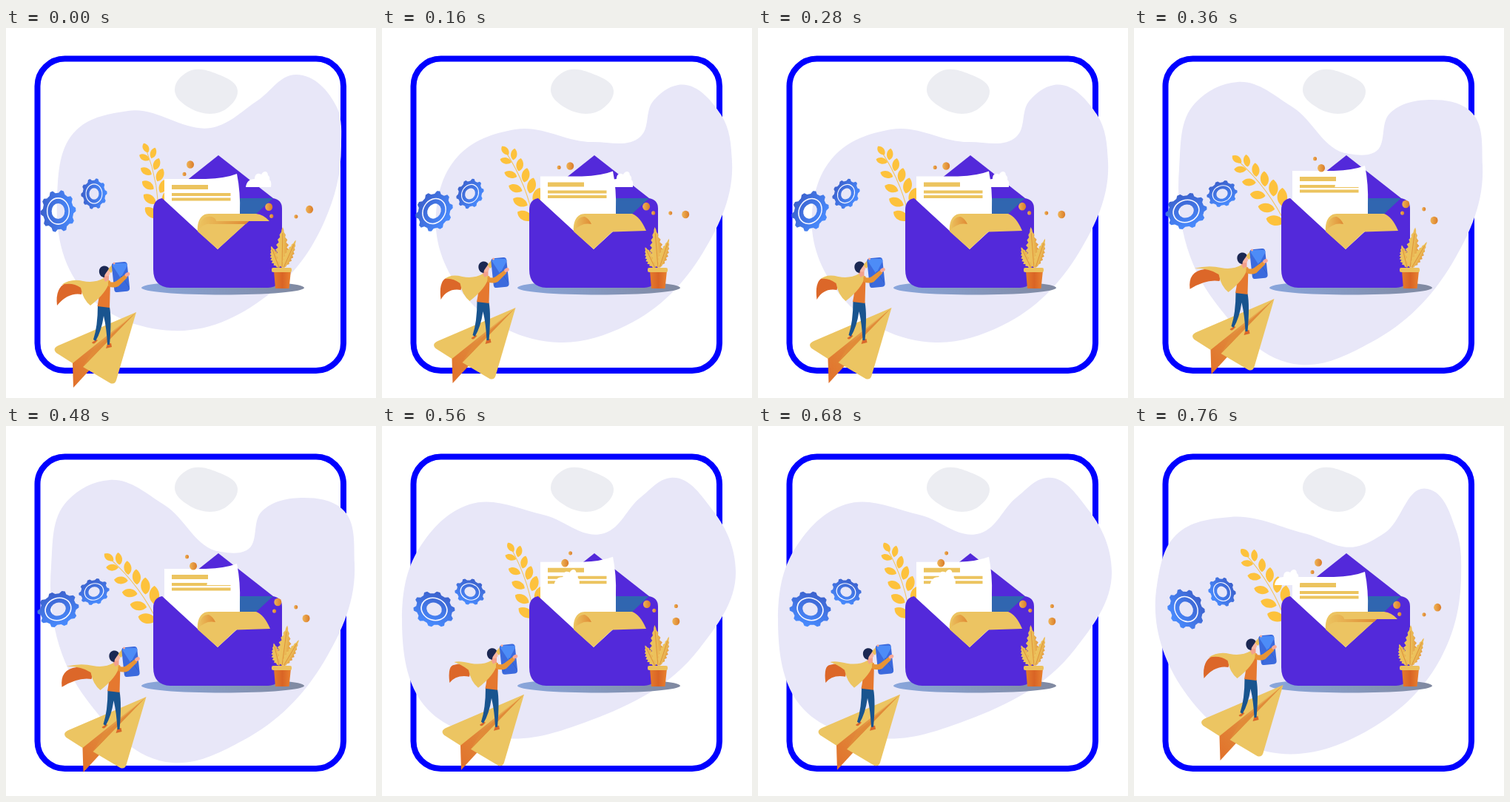
An HTML page for the animation above (800 ms loop, 500 px wide and 500 px high).

```html
<!DOCTYPE html>
<html lang="en">
<head>
<meta charset="utf-8">
<title>Mail delivery</title>
<style>
  html, body { margin: 0; width: 100%; height: 100%; overflow: hidden; background: #fff; }
  svg { display: block; width: 100vw; height: 100vh; }
</style>
</head>
<body>
<svg viewBox="0 0 500 500">
  <defs>
    <linearGradient id="shade"><stop stop-color="#89a6dc"/><stop offset="1" stop-color="#8089a0"/></linearGradient>
    <linearGradient id="steel" x2="0" y2="1"><stop stop-color="#498cff"/><stop offset="1" stop-color="#3c61cc"/></linearGradient>
    <linearGradient id="coin"><stop stop-color="#efb456"/><stop offset="1" stop-color="#da7c2a"/></linearGradient>
    <linearGradient id="clay"><stop stop-color="#e57b2d"/><stop offset=".5" stop-color="#d96425"/><stop offset="1" stop-color="#e9812f"/></linearGradient>
    <linearGradient id="leaf"><stop stop-color="#edc660"/><stop offset=".55" stop-color="#ebbd58"/><stop offset="1" stop-color="#e3963b"/></linearGradient>
    <linearGradient id="fold" x1="1" x2="0" y2="1"><stop stop-color="#ecc360"/><stop offset=".6" stop-color="#e0883a"/><stop offset="1" stop-color="#e2702a"/></linearGradient>
    <linearGradient id="curl"><stop stop-color="#ecc460"/><stop offset="1" stop-color="#df8a34"/></linearGradient>
  </defs>

  <rect x="42.500" y="41.500" width="413.500" height="421.500" rx="37" fill="none" stroke="#00f" stroke-width="8"/>
  <path id="blob" fill="#e8e7f8"/>
  <path id="patch" fill="#ecedf2"/>
  <ellipse cx="293" cy="351" rx="110" ry="9.500" fill="url(#shade)"/>
  <g id="spray" fill="#fdc23c"></g>

  <path d="M287 172L361 230V260H214V230Z" fill="#5329da"/>
  <path d="M316 230H361L336 254H316Z" fill="#3066b0"/>
  <path id="paper" fill="#fff"/>
  <path id="lines" fill="#ecc45f" d="M224 212h49v6h-49zM224 223h79.500v4h-79.500zM224 229.500h79.500v4h-79.500z"/>
  <path d="M199 246Q199 232 211 230L286 299L361 230Q373 232 373 244V331Q372 350 354 351H222Q199 350 199 326Z" fill="#5329da"/>
  <path id="scroll" fill="#ecc462"/>
  <path id="crease" fill="url(#curl)"/>
  <g id="dots" fill="url(#coin)"></g>
  <path id="cloud" fill="#fff" d="M0 0C1-8 6-11 12-11C12-18 17-20 21-17C24-23 30-22 30-16C34-13 31-10 33-9Q35-7 34 0Z"/>

  <g id="plant" fill="url(#leaf)"></g>
  <path d="M362 328H385L382.500 352H364Z" fill="url(#clay)"/>
  <rect x="359" y="324" width="27" height="6" rx="2" fill="#ecc05c"/>
  <g id="gears"></g>

  <g id="flyer">
    <path d="M176 384L71 429Q62 433 68 439L90 453L106 458Z" fill="#ecc562"/>
    <path d="M176 384L90 453L91 486L114 461Z" fill="url(#fold)"/>
    <path d="M176 384L104 458L141 480Q147 482 149 476Z" fill="#ecc562"/>
    <path d="M176 384L117 436L104 458Z" fill="#e18b38"/>
    <path d="M137 327L146 317L150 320L142 331Z" fill="#ecc05a"/>
    <path d="M122 421L116 425Q118 428 121 425L124 422ZM137 427L135 433L143 431L142 426Z" fill="#d9692b"/>
    <path d="M124 375L140 377Q143 393 140 428H137Q136 406 132 389Q129 410 121 423L118 421Q124 403 124 375Z" fill="#19548f"/>
    <path d="M126 343Q135 337 141 342L140 378L123.500 376Q127 360 126 343Z" fill="#e5782f"/>
    <path id="lining" fill="#dc6729"/>
    <path id="cape" fill="#ecc562"/>
    <path d="M130 334H139V340L134 343Z" fill="#f3a08c"/>
    <circle cx="136" cy="331" r="4.500" fill="#f8b5a2"/>
    <path d="M139 325C137 320 128 320 126 327C125 333 129 337 133 337C133 332 136 331 139 325Z" fill="#1b2853"/>
    <rect x="-10.500" y="-20" width="21" height="40" rx="4" transform="translate(155 336.500) rotate(-6)" fill="#3b6add"/>
    <path d="M146 318H161Q164 318 164 321L155 338L144 321Z" fill="#4d8cf7"/>
    <path d="M148 354L156 335L166 350" fill="none" stroke="#345fca"/>
    <path d="M138 342Q144 345 149 342L161 333L164 337L152 349Q146 352 138 349Z" fill="#e89435"/>
    <ellipse cx="164" cy="333" rx="3.500" ry="2.500" transform="rotate(-30 164 333)" fill="#f8a998"/>
    <circle cx="146" cy="318" r="1.500" fill="#f8a998"/>
  </g>
</svg>
<script>
const NS = 'http://www.w3.org/2000/svg';
const LOOP = 800, CLIP = 760, HOLD = 200, FIRST = 160;
const $ = id => document.getElementById(id);
const set = (node, attrs) => { for (const k in attrs) node.setAttribute(k, attrs[k]); };
const rad = deg => deg * Math.PI / 180;

function add(parent, tag, attrs) {
  const node = document.createElementNS(NS, tag);
  set(node, attrs);
  return parent.appendChild(node);
}

// Closed smooth curve through "x,y x,y ..."; tangents follow the circle through three neighbours
function smooth(text) {
  const p = text.split(' ').map(s => s.split(',').map(Number));
  const n = p.length;
  const edge = p.map((a, i) => {
    const b = p[(i + 1) % n], x = b[0] - a[0], y = b[1] - a[1], len = Math.hypot(x, y);
    return { len, x: x / len, y: y / len };
  });
  const dir = p.map((_, i) => {
    const e = edge[(i + n - 1) % n], f = edge[i];
    const x = e.x * f.len + f.x * e.len, y = e.y * f.len + f.y * e.len, len = Math.hypot(x, y);
    return [x / len, y / len];
  });
  let d = 'M' + p[0];
  p.forEach((a, i) => {
    const j = (i + 1) % n, h = edge[i].len * .35;
    d += `C${a.map((v, k) => v + dir[i][k] * h)} ${p[j].map((v, k) => v - dir[j][k] * h)} ${p[j]}`;
  });
  return d + 'Z';
}

function gearPath(r, teeth) {
  const pts = [], hole = r * .37;
  for (let i = 0; i < teeth * 4; i++) {
    const side = i % 4, k = side === 1 || side === 2 ? 1 : .87;
    const a = rad((i + (side === 0 ? .2 : side === 3 ? -.2 : 0)) * 90 / teeth);
    pts.push([r * k * Math.cos(a), r * k * Math.sin(a)]);
  }
  return `M${pts.join('L')}ZM${-hole} 0a${hole} ${hole} 0 1 0 ${2 * hole} 0a${hole} ${hole} 0 1 0 ${-2 * hole} 0Z`;
}

function makeGear(x, y, r) {
  const node = add($('gears'), 'g', {});
  add(node, 'path', { d: gearPath(r, 10), fill: 'url(#steel)', 'fill-rule': 'evenodd' });
  add(node, 'circle', { r: r * .62, fill: 'none', stroke: '#f8f8ff', 'stroke-width': r * .06 });
  return { node, x, y };
}

// Jagged leaf growing upwards from its root
function frond(x, len, width, angle) {
  const n = 16, left = [], right = [];
  for (let i = 0; i <= n; i++) {
    const t = i / n;
    const w = width * Math.sin(Math.PI * Math.pow(t, .75)) * (i % 2 ? 1 : .65);
    left.push([-w, -len * t]);
    right.unshift([w, -len * t]);
  }
  const transform = `translate(${x} 324) rotate(${angle})`;
  add($('plant'), 'path', { d: `M${left.concat(right).join('L')}Z`, transform });
  add($('plant'), 'path', { d: `M0 0V${-len * .85}`, stroke: '#dd8a35', 'stroke-width': .8, transform });
}

function lens(x, y, len, w, angle) {
  add($('spray'), 'path', {
    d: `M${-len} 0C${-len * .5} ${-w * 1.4} ${len * .6} ${-w * 1.3} ${len} 0C${len * .5} ${w * 1.3} ${-len * .6} ${w * 1.4} ${-len} 0Z`,
    transform: `translate(${x} ${y}) rotate(${angle})`
  });
}

set($('patch'), { d: smooth('228,83 246,59 285,62 313,85 298,109 250,109') });
const gears = [makeGear(70.5, 247.5, 28.5), makeGear(119, 224, 21)];
frond(369, 31, 7.5, -20);
frond(373, 55, 9.5, 1);
frond(375, 41, 6.5, 24);

add($('spray'), 'path', { d: 'M1 6Q20 55 18 106', fill: 'none', stroke: '#f3c561' });
lens(1, 5, 7, 4, 65);
for (let i = 0; i < 5; i++) {
  const len = 7.6 + .9 * i, w = 4 + .5 * i;
  lens(-1 + 2.4 * i, 18 + 18.7 * i, len, w, 28 + 3 * i);
  lens(11 + 4.6 * i, 12 + 14.8 * i, len, w, -70 + 2 * i);
}

// Two dots turning about a shared centre
const pairs = [
  (u) => [245 + 8 * u, 191 - 17 * u, 7.6, 122 + 240 * u],
  (u, sway) => [357 + 8 * Math.sin(Math.PI * u), 248 - 4 * Math.sin(Math.PI * u), 6.5, 74 + 37 * sway],
  (u) => [401 - 5 * u, 250 + 5 * u, 10.3, 152 + 160 * u]
].map(place => ({
  place,
  dots: [5, 2.5].map(r => add($('dots'), 'ellipse', { rx: r, ry: r * 1.06 }))
}));

// Key poses: flight distance, bend of the spray, outline of the backdrop
const poses = [
  { fly: 0, bend: 0,
    blob: '69,230 96,137 165,112 285,133 340,98 392,63 447,107 453,160 430,262 360,356 225,409 103,353' },
  { fly: 4.5, bend: 12,
    blob: '73,250 102,174 180,137 285,154 349,147 367,98 400,77 458,117 473,180 434,303 330,402 240,425 112,362' },
  { fly: 13.5, bend: 27,
    blob: '61,190 83,101 140,73 213,106 290,170 325,168 346,115 403,97 453,111 471,186 430,318 320,425 225,455 110,371' },
  { fly: 16, bend: 8,
    blob: '27,265 51,164 118,106 218,120 300,145 350,96 390,70 447,114 478,196 428,302 281,398 165,422 67,388' },
  { fly: 25.5, bend: 21,
    blob: '31,215 57,147 130,123 230,145 300,163 338,145 397,85 435,140 442,205 415,313 333,401 180,440 67,357' }
];

function drawPaper(u) {
  const lift = -31 * Math.pow(u, 1.4), y = 204 + lift, flat = u === 0;
  set($('lines'), { transform: `translate(0 ${lift})` });
  set($('paper'), { d: `M214 ${y}H270Q297 ${y - 1} 312 ${y - 7}Q317 ${y + 18} 316 ${y + 45}V275L286 299L214 240Z` });
  set($('scroll'), {
    d: 'M259 275C258 262 263 251 274 251' +
      (flat ? 'H338Q348 252 356 261H328L286 299Z' : 'H338Q349 255 357 274L311 275.5L286 299Z')
  });
  set($('crease'), {
    d: flat
      ? 'M262 264Q268 253 278 255Q284 257 284 261H328L324 265H276Q267 263 259 275Z'
      : 'M261 267Q265 254 274 255Q280 258 283 265Q270 262 259 274Z'
  });
}

function drawFlyer(fly, u, sway) {
  const x = 69 - 7 * sway, y = 375 - 9 * u;
  set($('flyer'), { transform: `translate(${fly} ${-fly * 4 / 3})` });
  set($('lining'), { d: `M${x} ${y}Q${x - 3} ${y - 24} 82 344Q98 340 104 351L102 360Q84 357 ${x} ${y}Z` });
  set($('cape'), { d: `M${x + 6} ${y - 28}Q88 338 104 342Q120 345 132 338L140 342Q136 358 114 375Q104 367 101 351Q90 343 ${x + 6} ${y - 28}Z` });
}

function draw(time) {
  const t = time % LOOP;
  const step = t < FIRST ? 0 : 1 + Math.floor((t - FIRST) / HOLD);
  const now = step && FIRST + (step - 1) * HOLD;
  const u = now % CLIP / CLIP;
  const sway = -Math.sin(rad(576 * u));
  const { fly, bend, blob } = poses[step];

  set($('blob'), { d: smooth(blob) });
  set($('spray'), { transform: `translate(217 262) rotate(${-bend}) scale(${1 + .004 * bend}) translate(-29 -105)` });
  set($('plant'), { transform: `rotate(${6.5 * sway} 372 324)` });
  set($('cloud'), { transform: `translate(${324 - 134 * Math.pow(now / CLIP, 1.25)} 215)` });
  drawPaper(u);
  drawFlyer(fly, u, sway);

  pairs.forEach(({ place, dots }) => {
    const [x, y, r, a] = place(u, sway);
    const dx = r * Math.cos(rad(a)), dy = r * Math.sin(rad(a));
    set(dots[0], { cx: x - dx, cy: y - dy });
    set(dots[1], { cx: x + dx, cy: y + dy });
  });
  gears.forEach(({ node, x, y }) =>
    set(node, { transform: `translate(${x} ${y}) rotate(${90 + .195 * now}) scale(1 .84)` }));
}

const start = performance.now();
function tick() {
  draw(Math.max(0, performance.now() - start));
  requestAnimationFrame(tick);
}
draw(0);
requestAnimationFrame(tick);
</script>
</body>
</html>
```
